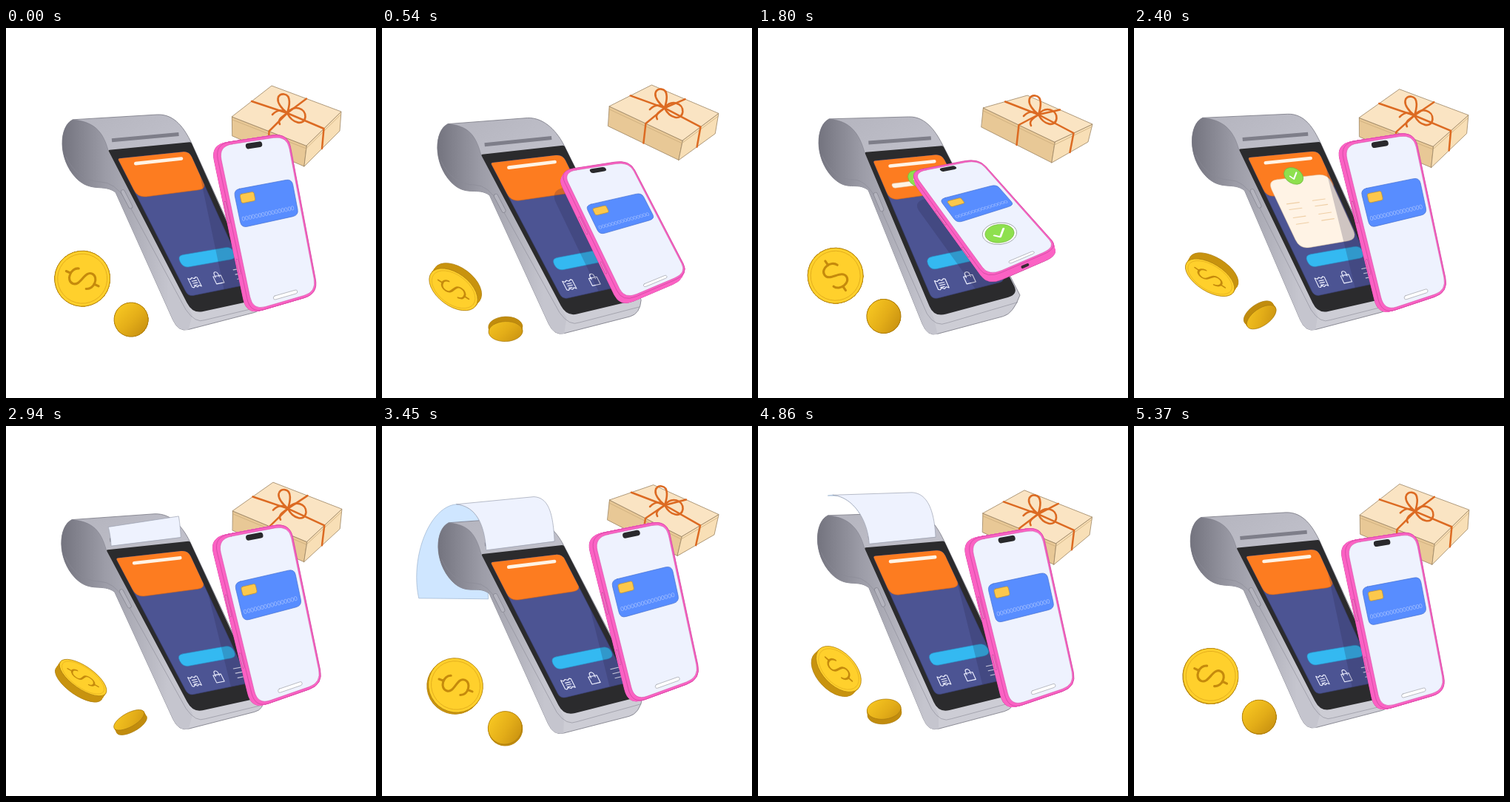
These frames come from a looping animation (500 by 500 pixels, 5400 ms). An HTML page with a canvas:

```html
<!DOCTYPE html>
<html lang="en">
<head>
<meta charset="utf-8">
<title>Contactless payment</title>
<style>
html, body { margin: 0; width: 100%; height: 100%; overflow: hidden; background: #fff; }
canvas { display: block; width: 500px; height: 500px; }
</style>
</head>
<body>
<canvas id="stage"></canvas>
<script>
const LOOP = 5400, IDLE = 2700, STEP = 30, TAU = Math.PI * 2;
const canvas = document.getElementById('stage');
const dpr = window.devicePixelRatio || 1;
canvas.width = canvas.height = 500 * dpr;
const c = canvas.getContext('2d');

// ---------- motion ----------
const KEYS = [0, 1050, 1800, 2400, 3450, 4380];

// Each idle shape has three poses, a third of the idle period apart.
const TERMINAL = [
  [138, 165, 250, 154, 345, 366, 252, 386],
  [135, 174, 245, 162, 352, 364, 243, 393],
  [144, 168, 250, 159, 352, 360, 238, 391]];
// head corner, head top end, neck, bottom left, bottom right
const BODY = [
  [90, 124, 205, 117, 148, 222, 233, 411, 349, 381],
  [91, 131, 194, 124, 145, 226, 231, 420, 347, 390],
  [96, 123, 204, 120, 149, 219, 229, 417, 345, 386]];
// top: left, back, right, front; base: left, front, right; knot
const GIFT = [
  [305, 120, 359, 78, 453, 113, 406, 159, 306, 146, 403, 187, 451, 139, 380, 115],
  [307, 97, 368, 82, 455, 123, 404, 148, 304, 124, 398, 174, 448, 150, 382, 107],
  [304, 108, 364, 91, 452, 130, 401, 154, 302, 134, 397, 182, 446, 154, 379, 117]];
// face corners clockwise, then depth offset
const PHONE = [
  [282, 157, 381, 142, 422, 359, 330, 386, -5, 1],
  [200, 223, 293, 207, 409, 304, 320, 351, -1, 11],
  [204, 194, 298, 176, 406, 297, 309, 339, 2, 9],
  [278, 156, 379, 140, 425, 357, 335, 387, -5, 1],
  [281, 148, 385, 127, 431, 342, 338, 376, -5, 1],
  [281, 151, 384, 132, 435, 345, 343, 380, -6, 1]];
const SHADOW = [[-24, 22], [0, 32], [4, 40], [-22, 22], [-16, 34], [-16, 34]];

const clamp = x => Math.max(0, Math.min(1, x));
const smooth = x => x < .5 ? 4 * x ** 3 : 1 - (2 - 2 * x) ** 3 / 2;
const ramp = (t, a, b) => smooth(clamp((t - a) / (b - a)));
const pulse = (t, a, b, d, e) => ramp(t, a, b) * (1 - ramp(t, d, e));
const pop = x => 1 + 2.2 * (x - 1) ** 3 + 1.2 * (x - 1) ** 2;

function idle(poses, t) {
  const w = [0, 1, 2].map(k => (1 + 2 * Math.cos(TAU * (t / IDLE - k / 3))) / 3);
  return poses[0].map((_, i) => w.reduce((s, wk, k) => s + wk * poses[k][i], 0));
}

// Periodic monotone cubic through the values at KEYS.
function track(vals, t) {
  const n = KEYS.length;
  const time = i => KEYS[(i + n) % n] + Math.floor(i / n) * LOOP;
  const val = i => vals[(i + n) % n];
  const slope = i => (val(i + 1) - val(i)) / (time(i + 1) - time(i));
  const tangent = i => {
    const a = slope(i - 1), b = slope(i);
    return a * b <= 0 ? 0 : 2 * a * b / (a + b);
  };
  let i = n - 1;
  while (KEYS[i] > t) i--;
  const h = time(i + 1) - time(i), s = (t - time(i)) / h, r = 1 - s;
  return val(i) * r * r * (1 + 2 * s) + val(i + 1) * s * s * (3 - 2 * s)
    + h * s * r * (tangent(i) * r - tangent(i + 1) * s);
}
const trackRow = (rows, t) => rows[0].map((_, i) => track(rows.map(r => r[i]), t));

// ---------- drawing helpers ----------
const mid = (a, b, k = .5) => [a[0] + (b[0] - a[0]) * k, a[1] + (b[1] - a[1]) * k];
const add = (p, x, y) => [p[0] + x, p[1] + y];
const toward = (a, b, d) => mid(a, b, d / Math.hypot(b[0] - a[0], b[1] - a[1]));
const points = f => Array.from({ length: f.length / 2 }, (_, i) => [f[2 * i], f[2 * i + 1]]);

function paint(fill, line, width = .8) {
  if (fill) { c.fillStyle = fill; c.fill(); }
  if (line) { c.strokeStyle = line; c.lineWidth = width; c.stroke(); }
}
function poly(pts, closed = true) {
  c.beginPath();
  pts.forEach(p => c.lineTo(...p));
  if (closed) c.closePath();
}
function path(d, line, width) {
  c.strokeStyle = line;
  c.lineWidth = width;
  c.stroke(new Path2D(d));
}
function within(draw) { c.save(); draw(); c.restore(); }

// A flat sheet of w by h, seen through four stage corners.
function surface(q, w, h) {
  const [tl, tr, br, bl] = points(q);
  const at = (u, v) => mid(mid(tl, bl, v), mid(tr, br, v), u);
  function round(u0, v0, u1, v1, r) {
    const [a, b, d, e] = Array.isArray(r) ? r : [r, r, r, r];
    const x = k => k / w, y = k => k / h;
    const curve = (cu, cv, u, v) => c.quadraticCurveTo(...at(cu, cv), ...at(u, v));
    c.beginPath();
    c.moveTo(...at(u0 + x(a), v0));
    c.lineTo(...at(u1 - x(b), v0)); curve(u1, v0, u1, v0 + y(b));
    c.lineTo(...at(u1, v1 - y(d))); curve(u1, v1, u1 - x(d), v1);
    c.lineTo(...at(u0 + x(e), v1)); curve(u0, v1, u0, v1 - y(e));
    c.lineTo(...at(u0, v0 + y(a))); curve(u0, v0, u0 + x(a), v0);
    c.closePath();
  }
  function line(u0, v0, u1, v1, color, width, cap = 'round') {
    c.lineCap = cap;
    poly([at(u0, v0), at(u1, v1)], false);
    paint(null, color, width);
  }
  function local(u, v, draw) {
    const p = at(u, v), pu = at(u + .1, v), pv = at(u, v + .1);
    const dx = k => (pu[k] - p[k]) / (.1 * w), dy = k => (pv[k] - p[k]) / (.1 * h);
    within(() => { c.transform(dx(0), dx(1), dy(0), dy(1), ...p); draw(); });
  }
  return { at, round, line, local };
}

function tick(r, ring) {
  if (r <= 0) return;
  c.lineCap = c.lineJoin = 'round';
  if (ring) {
    c.beginPath(); c.arc(0, 0, r * 1.18, 0, TAU); paint('#fff', '#8f9399', .8);
  }
  c.beginPath(); c.arc(0, 0, r, 0, TAU); paint('#8ee04e', '#6fb43c', .7);
  if (r < 6) return;
  c.scale(r / 17, r / 17);
  path('M-7 0L-2 6L8 -6', '#fff', 2.6);
}

// ---------- objects ----------
function drawGift(t) {
  const [l, b, r, f, bl, bf, br, knot] = points(idle(GIFT, t));
  const edge = '#9c8462', rib = '#dc6a22';
  c.lineJoin = c.lineCap = 'round';
  poly([l, f, bf, bl]); paint('#e8c896', edge);
  poly([f, r, br, bf]); paint('#f8dfb6', edge);
  poly([l, b, r, f]); paint('#fae4c3', edge);
  poly([mid(l, bl, .14), mid(f, bf, .14), mid(r, br, .14)], false);
  paint(null, '#c8a878', .7);
  poly([mid(l, b), knot, mid(r, f), mid(br, bf)], false); paint(null, rib, 2.5);
  poly([mid(b, r), knot, mid(l, f), mid(bl, bf)], false); paint(null, rib, 2.5);
  within(() => {
    c.translate(...knot);
    path('M0 0C-20 -17 -12 -27 -4 -25.5C6 -24 3 -9 0 0C9 -12 25 -7 24.5 5C23 18 7 14 0 0'
      + 'C-8 -6 -14 -4 -20 2M0 0C-5 4 -14 8 -10 15', rib, 2.6);
  });
}

function paperShape(term, t) {
  const amount = 2 * pulse(t, 2700, 3430, 4590, 5140);
  if (amount <= 0) return null;
  const k = ramp(t, 3450, 4380);
  const s = term.at(.08, -.02), e = term.at(.92, -.03);
  const mix = (x0, y0, x1, y1) => add(s, x0 + (x1 - x0) * k, y0 + (y1 - y0) * k);
  const top = mix(-40, -62, -49, -66);
  const topR = add(e, -28 - 4 * k, -60);
  return {
    amount,
    left: [s, add(s, -2, -32), add(top, 28, 3), top],
    right: [e, add(e, -2, -38), add(topR, 20, 1), topR],
    back: [top, mix(-77, -59, -94, -66), mix(-103, 10, -113, 30), mix(-91, 65, -78, 103)]
  };
}
function bezier([a, b, d, e], s) {
  const x = mid(a, b, s), y = mid(b, d, s), z = mid(d, e, s);
  return mid(mid(x, y, s), mid(y, z, s), s);
}
const sample = (curve, end) =>
  Array.from({ length: 25 }, (_, i) => bezier(curve, end * i / 24));

function drawPaperBack(p) {
  if (!p || p.amount <= 1) return;
  const outer = sample(p.back, p.amount - 1), tip = outer[24];
  poly([...outer, add(tip, 94, 1), p.left[0], ...sample(p.left, 1).slice(1)]);
  paint('#cfe6ff', '#9db4ce', .7);
}
function drawPaperFront(p) {
  if (!p) return;
  const end = Math.min(1, p.amount);
  poly([...sample(p.left, end), ...sample(p.right, end).reverse()]);
  paint('#eef2fe', '#9ba1b1', .7);
}

function drawTerminal(t, term, quad) {
  const [A, B, N, L, R] = points(idle(BODY, t));
  const [tl, tr, br, bl] = points(quad);
  const edge = '#777782';
  const leftSide = () => {
    const low = add(A, 5, 79);
    c.beginPath();
    c.moveTo(...A);
    c.bezierCurveTo(...add(A, -18, 8), ...add(A, -21, 52), ...low);
    c.bezierCurveTo(...add(low, 20, 20), ...add(N, -16, -12), ...N);
    c.lineTo(...toward(L, N, 18));
    c.quadraticCurveTo(...L, ...toward(L, R, 14));
  };
  const brow = () => c.bezierCurveTo(...add(tl, -7, -26), ...add(A, 28, 2), ...A);

  c.lineJoin = 'round';
  leftSide();
  c.lineTo(...toward(R, L, 14));
  c.quadraticCurveTo(...R, ...add(br, 2, 1));
  c.lineTo(...tr);
  c.bezierCurveTo(...add(tr, -8, -16), ...add(B, 24, -1), ...B);
  c.closePath();
  const shell = c.createLinearGradient(A[0], A[1], tr[0], bl[1]);
  shell.addColorStop(0, '#b4b4be'); shell.addColorStop(.3, '#bfbfc9'); shell.addColorStop(1, '#cdcdd5');
  paint(shell, edge);

  leftSide();
  c.lineTo(...add(bl, 0, 2));
  c.lineTo(...tl);
  brow();
  const side = c.createLinearGradient(A[0] - 12, 0, A[0] + 130, 0);
  side.addColorStop(0, '#757580'); side.addColorStop(.4, '#9c9ca7'); side.addColorStop(1, '#c5c5ce');
  paint(side);
  c.beginPath(); c.moveTo(...tl); brow(); paint(null, edge, .5);

  // seams, side key and paper slot
  c.beginPath();
  c.moveTo(...add(A, -9, 50));
  c.quadraticCurveTo(...add(A, 6, 82), ...add(N, -20, -14));
  c.quadraticCurveTo(...add(N, -2, -14), ...term.at(-.09, .3));
  c.lineTo(...term.at(-.06, .97));
  c.quadraticCurveTo(...term.at(-.03, 1.06), ...term.at(.12, 1.05));
  c.lineTo(...term.at(.95, 1.045));
  paint(null, '#8a8a95', .6);
  term.line(-.08, .25, -.08, .34, '#878792', 6);
  term.line(-.08, .25, -.08, .34, '#b4b4be', 4.6);
  term.line(.1, -.055, .9, -.055, '#7e7e89', 5, 'butt');

  term.round(0, 0, 1, 1, [2, 2, 14, 16]); paint('#2b2b2d');
  const screen = () => term.round(.06, .055, .93, .9, [3, 9, 8, 8]);
  screen(); paint('#4c5493', '#3b4279', .6);
  within(() => {
    screen(); c.clip();
    term.round(.06, .045, .94, .295, [0, 0, 12, 12]); paint('#fd7c20', '#c9631d', .6);
  });
  term.line(.24, .095, .8, .095, '#fff3e5', 4.6);
  term.round(.18, .66, .92, .735, 9); paint('#34b9f1', '#2a8fc4', .6);

  c.lineCap = c.lineJoin = 'round';
  const ink = '#eef0ff';
  term.local(.235, .828, () =>
    path('M-7 -7L-4 -5L-1 -7L2 -5L5 -7L7 -6V7L4 5L1 7L-2 5L-5 7L-7 6ZM-3 -2H4M-3 1H4M-3 4H2', ink, 1.2));
  term.local(.56, .828, () =>
    path('M-6 -3H6V8H-6ZM-3 -1V-5C-3 -10 3 -10 3 -5V-1', ink, 1.2));
  term.local(.86, .828, () => path('M-6 -7H6M-6 0H6M-6 7H6', ink, 1.2));

  drawReceipt(t, term);
}

function drawReceipt(t, term) {
  const open = pulse(t, 1680, 2150, 2580, 2860);
  if (open > 0) {
    const bottom = .2 + .42 * open, r = Math.min(14, 48 * open);
    within(() => {
      term.round(.16, .2, .92, bottom, r); paint('#fff3e5', '#d9bd9b', .5); c.clip();
      for (const v of [.35, .385, .435, .475])
        for (const u of [.26, .59]) term.line(u, v, u + .16, v, '#efcfa6', 1.1);
    });
  }
  const grow = clamp((t - 1560) / 230) * (1 - ramp(t, 2700, 2900));
  if (grow > 0) term.local(.5, .19, () => tick(12.5 * pop(grow)));
}

function drawPhone(t, row) {
  const q = row.slice(0, 8), [dx, dy] = row.slice(8);
  const s = surface(q, 98, 222);
  const face = () => s.round(0, 0, 1, 1, 20);
  const pink = '#fb62c4', edge = '#c8459b';
  for (let k = 14; k > 0; k--) within(() => {
    c.translate(dx * k / 14, dy * k / 14);
    face(); paint(pink, k === 14 ? edge : pink, 1);
  });
  // keys on the long side and the port on the short one
  within(() => {
    c.translate(dx * .5, dy * .5);
    s.line(0, .34, 0, .46, edge, 2.6); s.line(0, .34, 0, .46, '#ff86d4', 1.2);
    s.line(0, .68, 0, .76, edge, 2.6); s.line(0, .68, 0, .76, '#ff86d4', 1.2);
    if (dy > 7) s.line(.49, 1, .56, 1, '#3a2a35', 4 * clamp((dy - 7) / 2));
  });
  face(); paint(pink, edge, .7);
  s.round(.045, .015, .98, .986, 18); paint('#eef2fe', '#c8459b', .5);
  s.round(.405, .024, .63, .058, 3.6); paint('#29292c');
  s.round(.125, .28, .935, .505, 8); paint('#588dff', '#4570d0', .7);
  s.round(.195, .312, .39, .366, 2.5); paint('#fcc84c', '#b98d32', .7);
  s.local(.155, .457, () => {
    c.fillStyle = '#a6c1ff';
    c.font = '7.8px Lato, sans-serif';
    c.textBaseline = 'middle';
    c.fillText('0000000000000000', 0, 0);
  });
  s.round(.365, .94, .715, .962, 2.4); paint('#fff', '#a9abb3', .8);

  const grow = clamp((t - 1030) / 330) * (1 - ramp(t, 1960, 2230));
  if (grow > 0) s.local(.51, .7, () => tick(18 * pop(grow), grow > .5));
}

function drawShadow(t, term, row) {
  const [x, y] = trackRow(SHADOW, t);
  within(() => {
    term.round(.06, .055, .93, .9, [3, 9, 8, 8]); c.clip();
    c.translate(x, y);
    surface(row.slice(0, 8), 98, 222).round(0, 0, 1, 1, 22);
    paint('rgba(38,32,70,.22)');
  });
}

function drawCoin(x, y, r, thick, tilt, turn, fill, rim, decorate) {
  const cos = Math.cos(turn), sin = Math.sin(turn);
  const squash = Math.max(.02, Math.abs(cos));
  const depth = Math.sign(cos || 1) * -sin * thick;
  within(() => {
    c.translate(x, y);
    c.rotate(tilt);
    for (let k = 12; k >= 0; k--) {
      c.beginPath();
      c.ellipse(0, depth * (k / 12 - .5), r, r * squash, 0, 0, TAU);
      paint(k ? rim : fill, k === 12 || !k ? '#a97b10' : null, .7);
    }
    c.translate(0, -depth / 2);
    c.scale(1, squash);
    if (decorate) decorate();
  });
}

function drawCoins(t) {
  const bob = Math.cos(TAU * (t - 800) / IDLE), turn = Math.PI * t / 1800;
  const rad = vals => track(vals, t) * Math.PI / 180;
  const tilt = rad([38, 36, 35, 32, 40, 52]);
  const axis = rad([25, 35, 55, 35, 20, 50]);
  drawCoin(102.2 - 3.6 * bob, 341.6 + 10 * bob, 37.5, 11, tilt, turn, '#ffd02c', '#c8930f', () => {
    c.beginPath(); c.arc(0, 0, 33.5, 0, TAU); paint(null, '#e0aa1c', .8);
    c.rotate(axis - Math.PI / 2 - tilt);
    c.scale(1.15, 1.15);
    c.lineCap = 'round';
    path('M9 -9C6 -18 -10 -17 -10 -8C-10 2 10 -2 10 8C10 17 -6 18 -9 9M0 -15V-21M0 15V21', '#c58a0c', 2.7);
  });
  const gold = c.createLinearGradient(-15, -18, 15, 18);
  gold.addColorStop(0, '#f6c521'); gold.addColorStop(.55, '#e3ad18'); gold.addColorStop(1, '#cb9411');
  drawCoin(168.6 - 2 * bob, 397.4 + 11.5 * bob, 23, 8, rad([-5, 0, -20, -35, -20, -8]), turn, gold, '#c18c0e');
}

function draw(t) {
  c.setTransform(dpr, 0, 0, dpr, 0, 0);
  c.fillStyle = '#fff';
  c.fillRect(0, 0, 500, 500);
  const quad = idle(TERMINAL, t), term = surface(quad, 112, 240);
  const phone = trackRow(PHONE, t), paper = paperShape(term, t);
  drawGift(t);
  drawPaperBack(paper);
  drawTerminal(t, term, quad);
  drawPaperFront(paper);
  drawShadow(t, term, phone);
  drawPhone(t, phone);
  drawCoins(t);
}

const start = performance.now();
function play() {
  const t = (performance.now() - start) % LOOP;
  draw(Math.floor(t / STEP) * STEP);
  requestAnimationFrame(play);
}
play();
</script>
</body>
</html>
```
